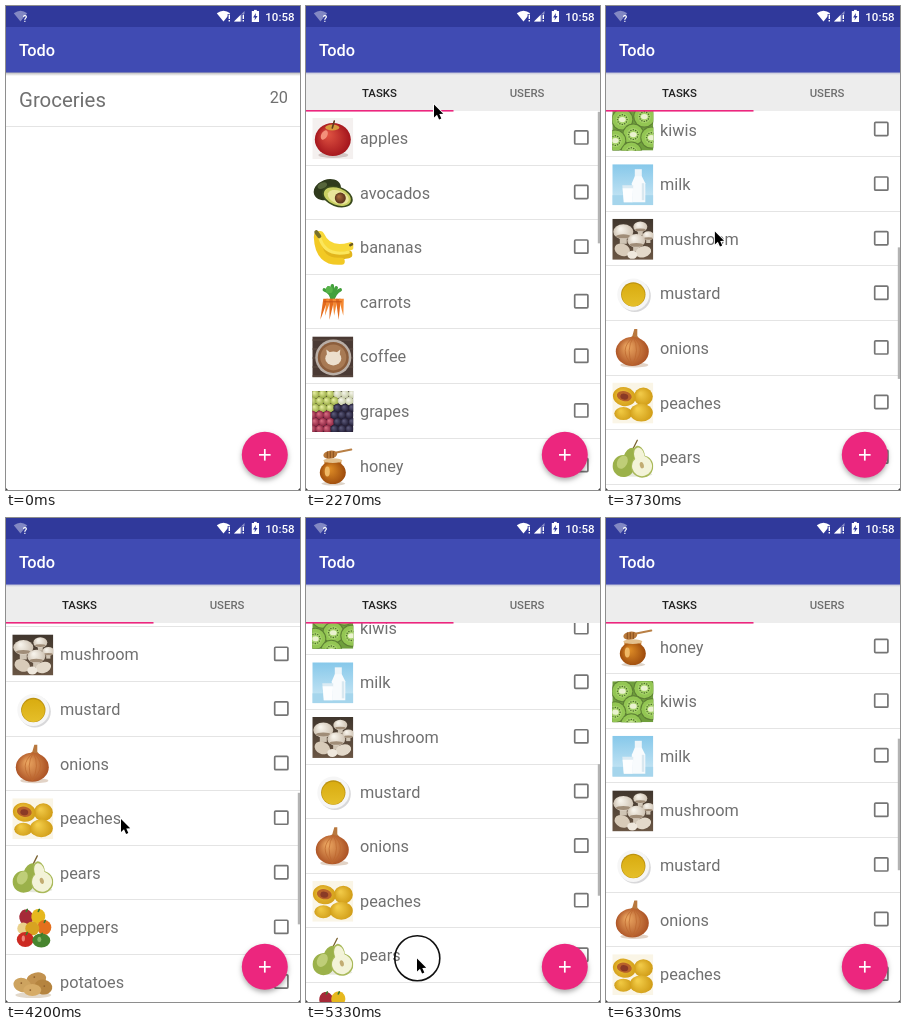
Recreate the animation shown at these times as an HTML page with a canvas. Size 294 px wide and 484 px high, loop 6390 ms.

```html
<!DOCTYPE html>
<html lang="en">
<head>
<meta charset="utf-8">
<title>Todo</title>
<style>
html, body { margin: 0; width: 100%; height: 100%; overflow: hidden; background: #fff; }
canvas { display: block; width: 294px; height: 484px; }
</style>
</head>
<body>
<canvas id="stage"></canvas>
<script>
const W = 294, H = 484, LOOP = 6390, STEP = 1000 / 15;
const ROW = 54.6, TOP = 105, VIEW = H - TOP, TOTAL = 20 * ROW;
const PINK = '#ec267e', GREY = '#707070', LINE = '#e4e4e4';

const canvas = document.getElementById('stage');
const dpr = window.devicePixelRatio || 1;
canvas.width = W * dpr;
canvas.height = H * dpr;
const c = canvas.getContext('2d');

// ---------- drawing helpers ----------
function rect(x, y, w, h, color) {
  c.fillStyle = color;
  c.fillRect(x, y, w, h);
}

function oval(x, y, rx, ry, color, turn = 0) {
  c.fillStyle = color;
  c.beginPath();
  c.ellipse(x, y, rx, ry, turn, 0, Math.PI * 2);
  c.fill();
}

const dot = (x, y, r, color) => oval(x, y, r, r, color);

function poly(points, color) {
  c.fillStyle = color;
  c.beginPath();
  for (let i = 0; i < points.length; i += 2) c.lineTo(points[i], points[i + 1]);
  c.closePath();
  c.fill();
}

function stroke(points, color, width) {
  c.strokeStyle = color;
  c.lineWidth = width;
  c.lineCap = 'round';
  c.beginPath();
  for (let i = 0; i < points.length; i += 2) c.lineTo(points[i], points[i + 1]);
  c.stroke();
}

function curve(x0, y0, cx, cy, x1, y1, color, width) {
  c.strokeStyle = color;
  c.lineWidth = width;
  c.lineCap = 'round';
  c.beginPath();
  c.moveTo(x0, y0);
  c.quadraticCurveTo(cx, cy, x1, y1);
  c.stroke();
}

function text(str, x, y, size, color, weight = 400, align = 'left') {
  c.font = `${weight} ${size}px Roboto, sans-serif`;
  c.textAlign = align;
  c.fillStyle = color;
  c.fillText(str, x, y);
}

function fade(y0, y1, from, to) {
  const g = c.createLinearGradient(0, y0, 0, y1);
  g.addColorStop(0, from);
  g.addColorStop(1, to);
  return g;
}

function glow(x, y, r, inner, outer) {
  const g = c.createRadialGradient(x - r * 0.3, y - r * 0.3, r * 0.1, x, y, r);
  g.addColorStop(0, inner);
  g.addColorStop(1, outer);
  return g;
}

const ball = (x, y, r, inner, outer) => dot(x, y, r, glow(x, y, r, inner, outer));

// ---------- thumbnails, each in a 41 x 41 box ----------
function pear(x, y, s, turn, color) {
  c.save();
  c.translate(x, y);
  c.rotate(turn);
  oval(0, -8 * s, 5 * s, 8 * s, color);
  oval(0, 3 * s, 10 * s, 10 * s, color);
  c.restore();
}

function mushroom(x, y, r) {
  rect(x - r * 0.35, y, r * 0.7, r * 1.2, '#cfc4b4');
  oval(x, y, r, r * 0.75, glow(x, y, r, '#f6f2ea', '#cfc3b3'));
  oval(x, y + r * 0.45, r * 0.75, r * 0.2, '#a08d78');
}

const items = {
  apples() {
    rect(0, 0, 41, 41, '#f4f0ef');
    oval(21, 37, 15, 3, '#d2c6c4');
    oval(20.5, 21.5, 18, 16.5, glow(20.5, 21.5, 18, '#dd5040', '#a3141c'));
    oval(20, 9.5, 7, 3, '#d79a3e');
    oval(12, 17, 3, 5, '#f3907a', 0.5);
    stroke([20, 10, 22, 3], '#5c3a1c', 1.6);
  },
  avocados() {
    oval(15, 17, 14, 10, '#2f3a1c', -0.35);
    oval(10, 13, 5, 3, '#56653a', -0.4);
    oval(25, 24, 16, 10, '#39491c', 0.35);
    oval(25, 24, 14, 8.5, '#c9cf63', 0.35);
    oval(26, 24.5, 11, 6.5, '#e9e49a', 0.35);
    ball(28, 25.5, 5.5, '#a5683a', '#57301a');
  },
  bananas() {
    curve(6, 8, 10, 32, 36, 27, '#e2b51c', 8);
    curve(8, 8, 16, 26, 38, 19, '#f8d838', 8);
    curve(5, 10, 6, 36, 29, 34, '#f2c924', 7);
    curve(7, 9, 12, 30, 36, 25, '#fbe65c', 3);
    stroke([4, 5, 7, 9], '#77702a', 4);
    stroke([38, 18, 40, 17], '#6a5920', 2.5);
  },
  carrots() {
    for (let i = 0; i < 5; i++) curve(20, 19, 19 + i, 10, 12 + i * 4, 4 + Math.abs(i - 2) * 2, '#43a03c', 3.4);
    dot(17, 8, 3.5, '#57b448');
    for (let i = 0; i < 6; i++) {
      const x = 11 + i * 3.1;
      poly([x, 17, x + 5, 17, 8 + i * 4.6, 38 - (i % 2) * 4], i % 2 ? '#f58a34' : '#e36a1c');
    }
    stroke([12, 20, 29, 20], '#c65518', 1);
  },
  coffee() {
    rect(0, 0, 41, 41, '#4a3a34');
    for (let i = 0; i < 5; i++) rect(0, 3 + i * 9, 41, 1.2, '#5e4b42');
    dot(21, 21, 18, '#b9aea6');
    dot(21, 21, 15.5, '#8c5e3c');
    dot(21, 21, 13, '#a87a54');
    oval(21, 22, 8, 7, '#ecdfcd');
    poly([14, 13, 19, 17, 15, 21], '#ecdfcd');
    poly([28, 13, 23, 17, 27, 21], '#ecdfcd');
  },
  grapes() {
    rect(0, 0, 41, 41, '#33232e');
    for (let j = 0; j < 6; j++) for (let i = 0; i < 6; i++) {
      const x = 3 + i * 7.4 - (j % 2) * 3, y = 3 + j * 7;
      if (y < 21 && x < 24) ball(x, y, 4.2, '#e3eb9c', '#9aac46');
      else if (x < 19) ball(x, y, 4.2, '#d66a80', '#8a2440');
      else if (y < 14) ball(x, y, 4.2, '#f3f3e8', '#c5cba4');
      else ball(x, y, 4.2, '#5a5878', '#211d35');
    }
  },
  honey() {
    oval(21, 38, 12, 2, '#ddd3c8');
    rect(12, 15, 17, 8, '#c9843a');
    oval(20.5, 27, 13, 11.5, glow(20.5, 27, 13, '#dd8b26', '#9c4a0c'));
    oval(15, 26, 2.5, 5, '#efb865');
    oval(20.5, 15, 9.5, 2.4, '#e3c08e');
    stroke([24, 7, 39, 4], '#b98046', 2);
    oval(18, 9, 7, 4, '#b9793a', -0.15);
    for (let i = 0; i < 3; i++) stroke([15 + i * 3, 6, 15 + i * 3, 12], '#7c4517', 0.8);
  },
  kiwis() {
    rect(0, 0, 41, 41, '#6f9f3c');
    for (const [x, y] of [[10, 10], [32, 7], [21, 25], [3, 31], [39, 28], [19, 43]]) {
      dot(x, y, 11, '#5d7f34');
      dot(x, y, 10, '#93c653');
      dot(x, y, 6.5, '#a5d268');
      for (let k = 0; k < 12; k++) dot(x + 4.8 * Math.cos(k * 0.524), y + 4.8 * Math.sin(k * 0.524), 0.7, '#47652a');
      oval(x, y, 3.4, 2.6, '#eaf2cf');
    }
  },
  milk() {
    rect(0, 0, 41, 41, fade(0, 41, '#86c8ea', '#cfe9f5'));
    rect(0, 31, 41, 10, '#a5d5ec');
    rect(22.5, 5, 7, 9, '#eef6fa');
    poly([22.5, 12, 29.5, 12, 33, 19, 33, 38, 19.5, 38, 19.5, 19], '#f8fbfd');
    rect(29.5, 19, 2.5, 17, '#d9e8f0');
    poly([10, 21, 21, 21, 20, 38, 11.5, 38], '#dcebf3');
    poly([10.3, 24, 20.7, 24, 20, 38, 11.5, 38], '#fdfeff');
  },
  mushroom() {
    rect(0, 0, 41, 41, fade(0, 41, '#40362d', '#6a5644'));
    mushroom(28, 8, 7);
    mushroom(36, 17, 6);
    mushroom(11, 13, 10);
    mushroom(24, 22, 9);
    oval(10, 31, 8, 6, '#d8cbb9', 0.4);
    oval(31, 33, 8, 5.5, '#e3d9ca', -0.3);
    oval(20, 36, 5, 4, '#efe8dd');
  },
  mustard() {
    dot(22.5, 22.5, 16, '#d8d8da');
    dot(21, 21, 16, '#f6f6f6');
    dot(21, 21, 12.2, '#bd930f');
    dot(21, 21.5, 11.4, fade(10, 33, '#d9ac10', '#e5bf2a'));
  },
  onions() {
    oval(22, 37, 14, 2.5, '#e2d3c6');
    poly([22, 1, 25, 1, 25, 8, 30, 14, 12, 14, 20, 8], '#b8783e');
    oval(20, 23.5, 16.5, 14.5, glow(20, 23.5, 17, '#e8a25e', '#a94f22'));
    for (const k of [5, 13, 28, 36]) curve(21, 9, k, 22, 20, 37, '#bd672f', 0.7);
  },
  peaches() {
    rect(0, 0, 41, 41, '#faf5e6');
    oval(31, 14, 9.5, 9, glow(31, 14, 10, '#f0c846', '#cf9a14'));
    oval(12, 14, 11.5, 9.5, glow(12, 14, 11, '#eec23c', '#d4a01a'), 0.2);
    oval(12, 13.5, 7.5, 5, '#b8622a', 0.2);
    oval(12, 14, 4, 3, '#8a3a26', 0.2);
    oval(11, 31, 9, 6.5, glow(11, 31, 9, '#efc740', '#cf9c18'));
    oval(29, 30, 11.5, 9, glow(29, 30, 12, '#f2cc48', '#cf9a14'));
  },
  pears() {
    oval(22, 37, 18, 2.5, '#e6e8dc');
    stroke([21, 11, 25, 3], '#7a6230', 1.3);
    pear(13, 26, 1.1, 0.55, '#9bb14a');
    oval(10, 25, 5, 7, '#bfce78', 0.5);
    pear(29, 26, 1.12, -0.25, '#a9b95a');
    pear(29, 26, 1, -0.25, '#f3f3d8');
    oval(29.5, 28, 2, 3.2, '#c2ac72', -0.25);
  },
  peppers() {
    oval(14, 10, 7, 8, '#a52a38', -0.2);
    oval(26, 9, 7, 7.5, '#e6b81e', 0.2);
    oval(32, 20, 7, 7.5, '#e4701e');
    oval(11, 21, 6, 6, '#ead08a');
    oval(20, 21, 7, 7, '#d8a321');
    oval(13, 32, 8.5, 7.5, '#cc2a22');
    oval(29, 33, 9, 7, '#47852f');
    for (const [x, y] of [[14, 4], [26, 4], [32, 15], [14, 27], [29, 28]]) stroke([x, y, x + 1, y - 2], '#3c7a2c', 1.6);
    oval(11, 31, 1.6, 3, '#ee8478');
    oval(27, 32, 2, 2.6, '#86b566');
  },
  potatoes() {
    oval(21, 33, 18, 3, '#e2d8ca');
    oval(24, 17, 10, 6.5, '#c2924f', -0.2);
    oval(10, 23, 9, 7, '#cda35f', 0.3);
    oval(31, 25, 9, 7.5, '#b5843f', 0.2);
    oval(20, 28, 9, 6, '#d6ab66');
    for (const [x, y] of [[9, 21], [22, 15], [32, 24], [18, 28]]) dot(x, y, 0.9, '#8d5f2c');
  }
};
const names = Object.keys(items);

// ---------- interface parts ----------
function wifi(x, y, color) {
  c.fillStyle = color;
  c.beginPath();
  c.moveTo(x, y + 10.5);
  c.lineTo(x - 6.7, y + 2.2);
  c.quadraticCurveTo(x, y - 2.8, x + 6.7, y + 2.2);
  c.closePath();
  c.fill();
}

function alertMark(x) {
  rect(x - 1, 8, 3.4, 8, '#30399b');
  rect(x, 8.6, 1.4, 4.4, '#fff');
  rect(x, 14, 1.4, 1.5, '#fff');
}

function header() {
  rect(0, 0, W, 21, '#30399b');
  rect(0, 21, W, 45.5, '#404bb3');
  wifi(14.5, 5, 'rgba(255,255,255,.4)');
  text('?', 19, 15.6, 9, '#fff', 700, 'center');
  wifi(217.5, 5, '#fff');
  alertMark(222.6);
  poly([228, 15.5, 238.5, 15.5, 238.5, 5], 'rgba(255,255,255,.45)');
  poly([228, 15.5, 234.5, 15.5, 234.5, 9], '#fff');
  alertMark(236.6);
  rect(245.8, 5, 7.2, 11, '#fff');
  rect(248, 3.9, 2.8, 1.5, '#fff');
  poly([250, 7, 247, 11.4, 249, 11.4, 248.5, 14.6, 251.6, 10.1, 249.6, 10.1], '#30399b');
  text('10:58', 288.5, 15, 11.5, '#fff', 500, 'right');
  text('Todo', 13, 49.7, 16.3, '#fff', 500);
}

function fab() {
  c.save();
  c.shadowColor = 'rgba(0,0,0,.32)';
  c.shadowBlur = 5 * dpr;
  c.shadowOffsetY = 2.5 * dpr;
  dot(258.8, 448.8, 23, PINK);
  c.restore();
  rect(253, 448, 11.6, 1.7, '#fff');
  rect(257.95, 443, 1.7, 11.6, '#fff');
}

function homeScreen(press) {
  rect(0, 0, W, H, '#fff');
  if (press > 0) rect(0, 67, W, 53, `rgba(0,0,0,${0.08 * press})`);
  text('Groceries', 13, 101, 20.4, GREY);
  text('20', 282, 97, 16.3, GREY, 400, 'right');
  rect(0, 120, W, 1, LINE);
  rect(0, 66, W, 4, fade(66, 70, 'rgba(0,0,0,.32)', 'rgba(0,0,0,0)'));
  header();
  fab();
}

function row(i, y) {
  c.save();
  c.translate(6.3, y + 7);
  c.beginPath();
  c.rect(0, 0, 41, 41);
  c.clip();
  items[names[i]]();
  c.restore();
  text(names[i], 54, y + 33, 16.3, GREY);
  c.strokeStyle = '#757575';
  c.lineWidth = 1.7;
  c.beginPath();
  c.roundRect(268.7, y + 19.8, 13.2, 13.2, 1);
  c.stroke();
  rect(0, Math.round(y + ROW - 1), W, 1, LINE);
}

function listScreen(scroll) {
  rect(0, 0, W, H, '#fff');
  c.save();
  c.beginPath();
  c.rect(0, TOP, W, VIEW);
  c.clip();
  for (let i = 0; i < names.length; i++) {
    const y = TOP + i * ROW - scroll;
    if (y > TOP - ROW && y < H) row(i, y);
  }
  rect(291.8, TOP + 0.8 + scroll * VIEW / TOTAL, 2.2, VIEW * VIEW / TOTAL, '#b3b3b3');
  c.restore();
  rect(0, 66, W, 39, '#ededed');
  rect(0, 66, W, 3, fade(66, 69, '#b4b7d2', '#ededed'));
  text('TASKS', 73.5, 90.7, 11.4, '#212121', 500, 'center');
  text('USERS', 221, 90.7, 11.4, '#6e6e6e', 500, 'center');
  rect(0, 104, 147.5, 1.6, PINK);
  header();
  fab();
}

function pointer(x, y, ring) {
  if (ring) {
    c.strokeStyle = '#111';
    c.lineWidth = 1.6;
    c.beginPath();
    c.arc(x + 0.3, y - 0.3, 22.5, 0, Math.PI * 2);
    c.stroke();
  }
  const shape = [0, 0, 0, 13, 3, 10.3, 5.1, 15, 7.3, 14, 5.3, 9.5, 9.2, 9.3];
  const pts = shape.map((v, i) => v + (i % 2 ? y : x));
  c.lineJoin = 'round';
  stroke([...pts, pts[0], pts[1]], '#fff', 1.8);
  poly(pts, '#000');
}

// ---------- motion ----------
const part = (t, a, b) => Math.min(1, Math.max(0, (t - a) / (b - a)));
const smooth = u => u * u * (3 - 2 * u);
const fling = (u, p) => 1 - Math.pow(1 - u, p);

function scrollAt(t) {
  if (t < 3330) return 130 * Math.pow(part(t, 3000, 3330), 2.4);
  if (t < 4900) return 130 + 362 * fling(part(t, 3330, 4450), 2.85);
  if (t < 5400) return 492 - 101 * part(t, 4900, 5400);
  return 391 - 60 * fling(part(t, 5400, 6030), 2.5);
}

// time, x, y of the pointer's resting places
const stops = [
  [300, 300, 150], [950, 128, 98.5], [2350, 128, 98.5], [2850, 104, 327], [3000, 104, 327],
  [3330, 104, 197], [3450, 106, 190], [4200, 115, 301], [4800, 111, 353], [4900, 111, 353],
  [5400, 111, 454], [5500, 111, 454], [5950, 305, 400]
];

function pointerAt(t) {
  const i = stops.findIndex(s => s[0] > t);
  if (i < 1) return null;
  const [a, ax, ay] = stops[i - 1], [b, bx, by] = stops[i];
  const u = smooth(part(t, a, b));
  let y = ay + (by - ay) * u;
  // the list follows the finger while dragging
  if (a === 3000) y = 327 - scrollAt(t);
  if (a === 4900) y = 845 - scrollAt(t);
  return [ax + (bx - ax) * u, y];
}

const within = (t, a, b) => t >= a && t < b;

function draw(t) {
  c.setTransform(dpr, 0, 0, dpr, 0, 0);
  c.globalAlpha = 1;
  const enter = part(t, 1670, 1930);
  if (enter < 1) homeScreen(part(t, 1460, 1600));
  if (enter > 0) {
    c.save();
    c.globalAlpha = enter;
    c.translate(0, 38 * Math.pow(1 - enter, 2.5));
    listScreen(scrollAt(t));
    c.restore();
  }
  poly([0, H, 0, H - 2, 2, H], '#444');
  poly([W, H, W, H - 2, W - 2, H], '#444');
  const p = pointerAt(t);
  if (p) pointer(p[0], p[1], within(t, 1450, 1600) || within(t, 2930, 3340) || within(t, 4850, 5410));
}

const start = performance.now();
function tick() {
  const t = (performance.now() - start) % LOOP;
  draw(Math.floor((t + 4) / STEP) * STEP);
  requestAnimationFrame(tick);
}
tick();
</script>
</body>
</html>
```
